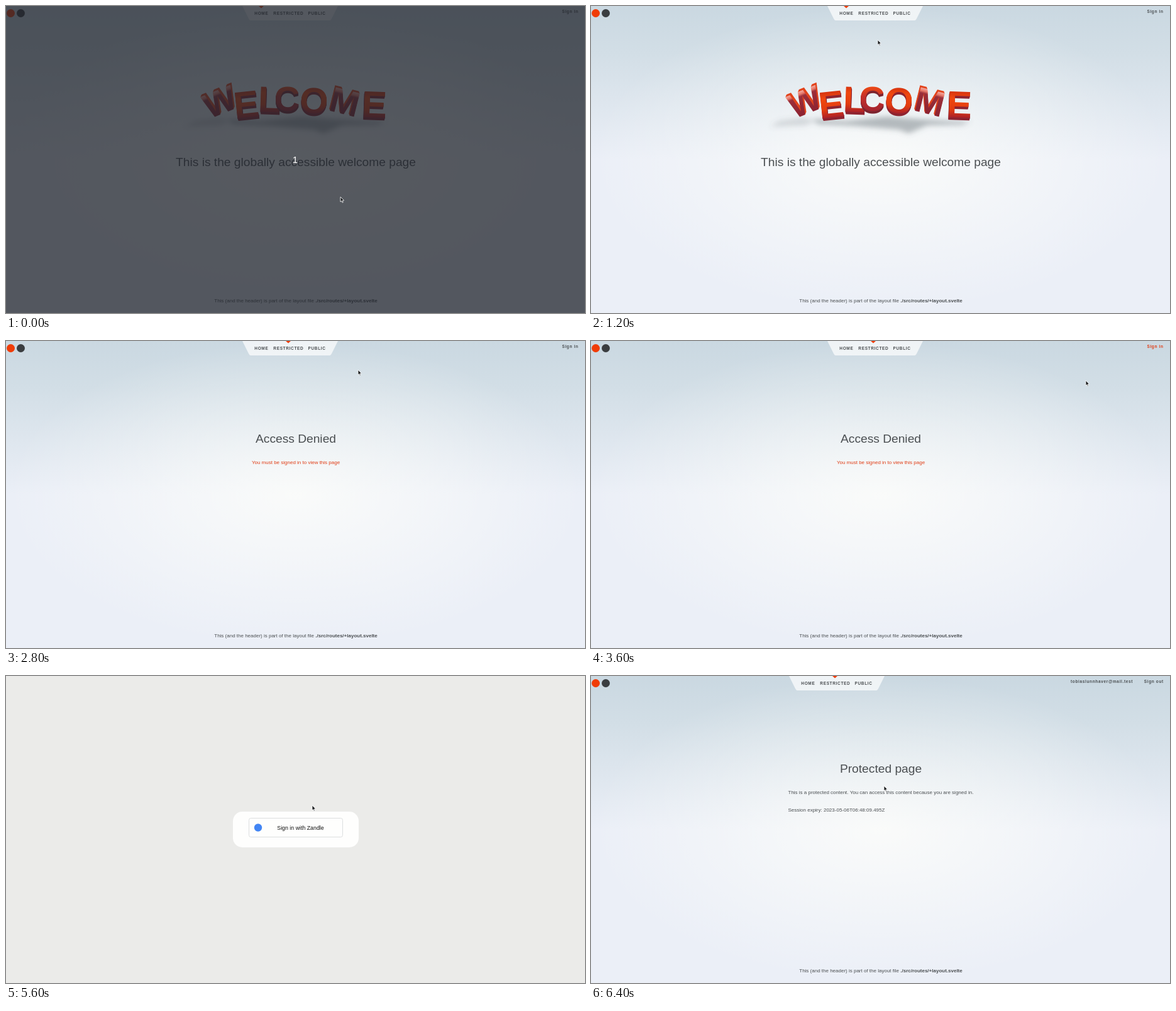
These frames come from a looping animation (921 px wide and 489 px high, 7.6 s). An HTML page:

```html
<!DOCTYPE html>
<html lang="en">
<head>
<meta charset="utf-8">
<title>Sign-in demo</title>
<style>
  html, body { margin: 0; width: 100%; height: 100%; overflow: hidden; }
  body { background: #ebebe9; }
  svg, #page { position: absolute; left: 0; top: 0; width: 921px; height: 489px; }
  #page {
    background:
      radial-gradient(50% 50% at 50% 50%, rgba(255, 255, 251, .75), rgba(255, 255, 251, 0)),
      linear-gradient(rgb(202, 216, 225), rgb(210, 222, 230) 15%, rgb(235, 239, 247) 50%);
  }
  text { font: 8px "Liberation Sans", Arial, sans-serif; fill: #4b4f52; white-space: pre; }
  .title { font-size: 19.2px; text-anchor: middle; }
  .menu { font-size: 6.5px; font-weight: 700; letter-spacing: .1em; }
  .mid { text-anchor: middle; }
  .warn, .hot { fill: #e03c14; }
  .black { fill: #111; font-size: 8.8px; }
  .url { font: 6.8px "Noto Sans", "Open Sans", sans-serif; fill: #f0f2f3; }
  .count { font-size: 15px; fill: #fff; text-anchor: middle; }
  .glyph text { font-weight: 700; text-anchor: middle; }
</style>
</head>
<body>
<div id="page"></div>
<svg viewBox="0 0 921 489">
  <defs>
    <filter id="blur" x="-30%" y="-60%" width="160%" height="220%"><feGaussianBlur stdDeviation="4"/></filter>
    <linearGradient id="orange" x2="0" y2="1">
      <stop offset=".2" stop-color="#d8350f"/><stop offset=".35" stop-color="#f0480f"/>
      <stop offset=".62" stop-color="#e23c10"/><stop offset=".82" stop-color="#a8202a"/>
    </linearGradient>
    <linearGradient id="maroon" x2="0" y2="1">
      <stop offset=".19" stop-color="#f3aea5"/><stop offset=".27" stop-color="#e7796a"/>
      <stop offset=".33" stop-color="#9b2f3a"/><stop offset=".82" stop-color="#8c2230"/>
    </linearGradient>
    <linearGradient id="red" x2="0" y2="1">
      <stop offset=".19" stop-color="#ee4a14"/><stop offset=".45" stop-color="#c4302a"/>
      <stop offset=".82" stop-color="#a1242f"/>
    </linearGradient>
  </defs>

  <g id="site">
    <circle cx="7.5" cy="11.5" r="6.5" fill="#f03c06"/>
    <circle cx="23.5" cy="11.5" r="6.5" fill="#3a3d40"/>
    <g id="nav">
      <path d="M376 0L383.7 15.4C387.5 23 387.5 23 391.4 23H512.6C516.5 23 516.5 23 520.3 15.4L528 0Z" fill="#fff" fill-opacity=".7"/>
      <path id="tick" d="M-4 0H4L0 3.5Z" fill="#f03c06"/>
      <text class="menu" x="395.3" y="14.2">HOME</text>
      <text class="menu" id="restricted" x="425.3" y="14.2">RESTRICTED</text>
      <text class="menu" x="480.5" y="14.2">PUBLIC</text>
    </g>
    <text class="menu" id="sign" y="11.2"></text>
    <text class="menu" id="user" x="763" y="11.2">tobiaslunnhaver@mail.test</text>

    <g id="home">
      <g filter="url(#blur)" fill="#5c666b">
        <path d="M355 180L405 183L470 176L520 180L570 183L604 184L590 189L535 190L505 203L490 197L420 191L360 188Z" opacity=".42"/>
        <path d="M300 183L335 178L362 182L340 190L285 192Z" opacity=".2"/>
      </g>
      <g id="banner"></g>
      <text class="title" x="461" y="255.3">This is the globally accessible welcome page</text>
    </g>
    <g id="denied">
      <text class="title" x="461" y="162">Access Denied</text>
      <text class="mid warn" x="461" y="196">You must be signed in to view this page</text>
    </g>
    <g id="secret">
      <text class="title" x="461" y="153.5">Protected page</text>
      <text x="313.5" y="187.5">This is a protected content. You can access this content because you are signed in.</text>
      <text x="313.5" y="215.5">Session expiry: 2023-05-06T06:48:09.495Z</text>
    </g>
    <text class="mid" x="461" y="472">This (and the header) is part of the layout file <tspan font-weight="700">./src/routes/+layout.svelte</tspan></text>
    <g id="status">
      <path d="M0 478.5H89.5Q91 478.5 91 480V489H0Z" fill="#82888b"/>
      <text class="url" x="2" y="486.4">localhost:5173/restricted</text>
    </g>
  </g>

  <g id="login">
    <rect x="361" y="216" width="200" height="57" rx="15" fill="#fefefd"/>
    <rect x="386.5" y="226.5" width="149" height="30" rx="3" fill="#fefefd" stroke="#dcdedf"/>
    <circle cx="401" cy="241.5" r="6.2" fill="#4285f4"/>
    <text class="black" x="431.3" y="244.7">Sign in with Zandle</text>
  </g>

  <g id="dim">
    <rect width="921" height="489" fill="rgb(33,37,44)" fill-opacity=".75"/>
    <text class="count" x="460" y="249.8">1</text>
  </g>

  <g id="cursor" stroke="#fff" stroke-width=".8" fill="#1c1e20">
    <path id="arrow" d="M0 0V8L1.8 6.4L3 9.2L4.3 8.6L3.1 5.9L5.6 5.7Z"/>
    <path id="hand" stroke-width=".5" d="M0 0Q.8-.9 1.5 0V2.8L4.4 3.3Q5.4 3.6 5.3 4.6L4.8 7.8H.6L-1.6 4.8Q-1.4 3.8 0 4.7Z"/>
  </g>
</svg>
<script>
const LOOP = 7600;
const $ = id => document.getElementById(id);
const show = (id, on) => { $(id).style.display = on ? "" : "none"; };

// letter, centre x, centre y, angle, size, face, side colour, depth x, depth y
const letters = [
  ["W", 340, 153, -22, 55, "maroon", "#e2441c", 3, -3],
  ["L", 419, 149, 2, 58, "orange", "#8f2430", 1, 4],
  ["E", 382, 157, -6, 60, "orange", "#8f2430", 1, 4],
  ["C", 447, 148, 0, 56, "red", "#7d2530", 0, 4],
  ["M", 539, 153, 14, 56, "maroon", "#e2441c", -2, -3],
  ["O", 490, 151, 4, 58, "orange", "#8f2430", 0, 4],
  ["E", 586, 157, 2, 60, "orange", "#8f2430", -1, 4]
];

$("banner").innerHTML = letters.map(([ch, x, y, turn, size, face, side, dx, dy]) => {
  const put = (k, fill) =>
    `<text x="${dx * k}" y="${size * .344 + dy * k}" style="font-size:${size}px;fill:${fill}">${ch}</text>`;
  const sides = [1, .75, .5, .25].map(k => put(k, side)).join("");
  return `<g class="glyph" transform="translate(${x} ${y}) rotate(${turn})">${sides}${put(0, `url(#${face})`)}</g>`;
}).join("");

// time, x, y, pointing hand
const path = [
  [0, 532, 304], [200, 552, 373], [400, 549, 341], [600, 533, 272], [800, 508, 190],
  [1000, 481, 112], [1200, 456, 54], [1400, 442, 24], [1600, 438, 14, 1], [2000, 439, 15, 1],
  [2600, 449, 17, 1], [2800, 560, 46], [3000, 735, 42], [3200, 888, 13, 1], [3400, 907, 8, 1],
  [3600, 787, 63], [3800, 643, 124], [4000, 540, 196], [4200, 491, 238, 1],
  [5000, 491, 236, 1], [5200, 490, 229, 1], [5400, 488, 218], [5600, 487, 206],
  [5800, 484, 197], [6000, 480, 189], [6200, 473, 181], [6400, 466, 175]
];

const scenes = [[0, "home"], [1800, "denied"], [3800, "login"], [6000, "secret"]];
const at = (table, t) => table.filter(row => row[0] <= t).pop();

function draw(t) {
  const scene = at(scenes, t)[1];
  const [, x, y, hand] = at(path, t);
  const inside = scene === "secret";
  const hover = t >= 1600 && t < 2800;

  for (const [, id] of scenes) show(id, id === scene);
  show("page", scene !== "login");
  show("site", scene !== "login");
  show("dim", t < 200);
  show("status", hover);
  show("user", inside);

  $("nav").setAttribute("transform", `translate(${inside ? -61 : 0} 0)`);
  $("tick").setAttribute("transform", `translate(${scene === "home" ? 406 : 449} 0)`);
  $("restricted").classList.toggle("hot", hover);
  $("sign").textContent = inside ? "Sign out" : "Sign in";
  $("sign").setAttribute("x", inside ? 879.7 : 884.4);
  $("sign").classList.toggle("hot", t >= 3200 && t < 3800);

  $("cursor").setAttribute("transform", `translate(${x} ${y})`);
  show("arrow", !hand);
  show("hand", hand);
}

const start = performance.now();
function tick() {
  draw((performance.now() - start) % LOOP);
  requestAnimationFrame(tick);
}
tick();
</script>
</body>
</html>
```
